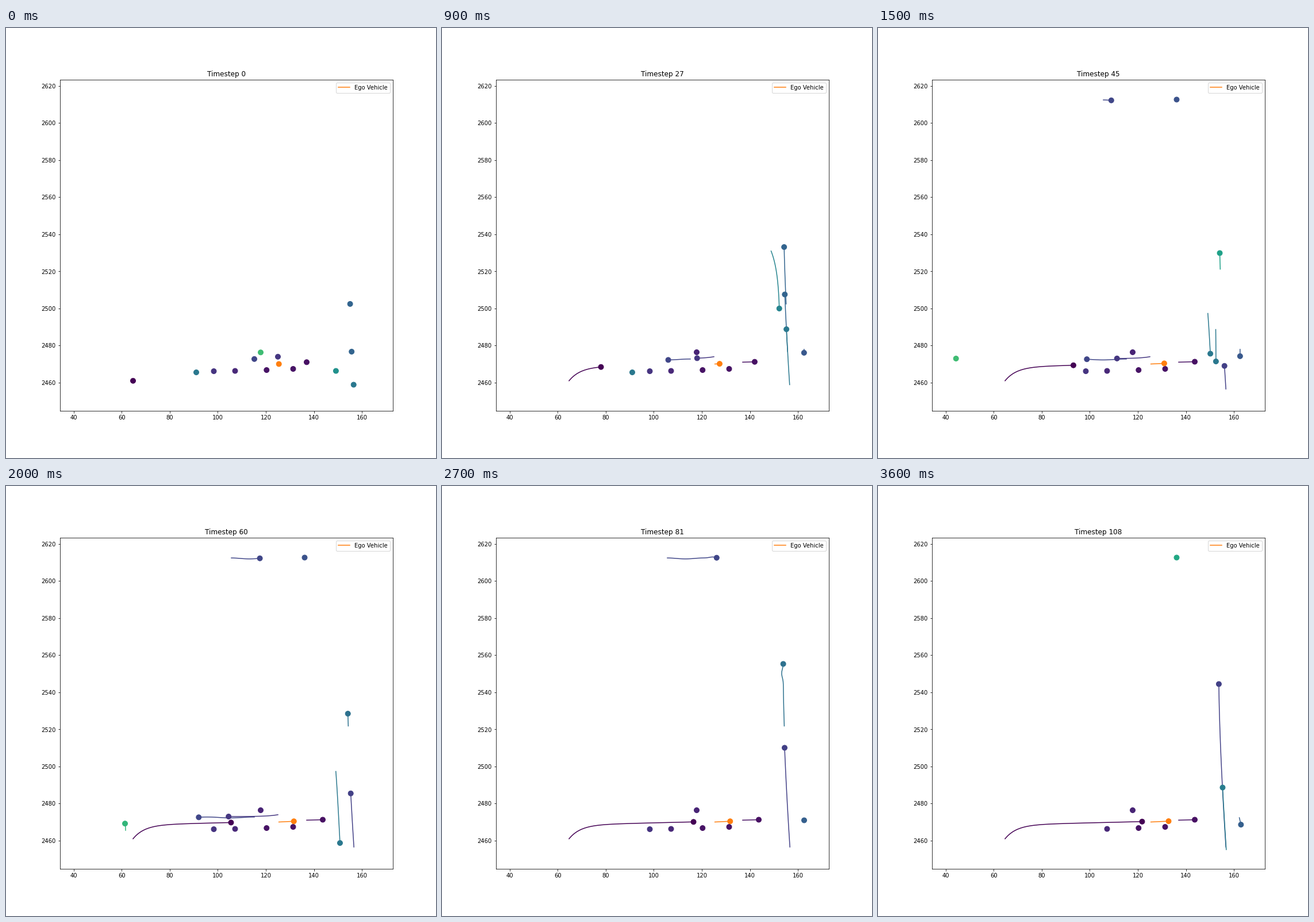
A matplotlib script for the animation above (3.7 s loop, 748 by 748 pixels).

```python
import numpy as np
import matplotlib.pyplot as plt
from matplotlib.animation import FuncAnimation

SIZE, DPI = 748, 72
FRAMES, STEP = 37, 3
LAST = (FRAMES - 1) * STEP
EGO = "#ff7f0e"


def to_data(px, py):
    """Stage pixels to plot units."""
    return 40 + (px - 117.5) / 4.183, 2460 + (617 - py) / 3.225


def run(t, speed, accel=0):
    return speed * t + accel * t ** 2


def logistic(t, mid, width):
    return 1 / (1 + np.exp((mid - t) / width))


def north_lane(y):
    curve = 12 * (np.maximum(y - 345, 0) / 280) ** 1.5
    return 593 + curve - 3 * np.exp(-((y - 326) / 10) ** 2)


def south_lane(y):
    return 588 - 15.5 * np.exp((388 - y) / 40)


cars = []


def add(color, first, last, path):
    """path maps steps since birth to stage pixels."""
    if not isinstance(color, str):
        color = plt.cm.viridis(color)
    t = np.arange(last - first + 1.0)
    cars.append((color, first, last, to_data(*path(t))))


def park(shade, x, y, first=0, last=LAST):
    add(shade, first, last, lambda t: (x + 0 * t, y + 0 * t))


def drive(shade, first, last, y0, speed, accel=0, dx=0, drift=0):
    """Follow the north or south lane, depending on the sign of speed."""
    lane = north_lane if speed < 0 else south_lane

    def path(t):
        y = y0 + run(t, speed, accel)
        return lane(y) + dx + drift * (y - y0), y
    add(shade, first, last, path)


def merging(t):
    dx = 268 * (logistic(t, 43, 18) - logistic(0, 43, 18))
    return 221 + dx, 589.5 - 0.024 * dx + 24.2 * np.exp(-dx / 20)


def westbound_near(t):
    dx = run(t, 1.27, 0.0057)
    return 432 - dx, 576.6 - 0.8 * np.cos(dx / 13)


def westbound_far(t):
    dx = run(t, 0.8, 0.0105)
    return 473 - dx, 575 - 3.2 * np.exp(-dx / 18)


def stopping(t):
    s = 1 - (1 - np.minimum(t / 45, 1)) ** 1.5
    return 523 + 28 * s, 581.3 - 0.8 * s


def top_street(t):
    dx = run(t, 2.85, -0.0185)
    bump = 2.6 * np.exp(-((dx - 80) / 9) ** 2)
    return 392 + dx, 126 - 0.8 * np.cos(dx / 10) - bump


def turning(t):
    s = t / 15
    return 208 - 24 * s ** 2, 579 + 20 * (1 - s) ** 4


def ego(t):
    dx = 26.6 * logistic(t, 32, 6.5) + 5 * logistic(t, 98, 5)
    return 474.5 + dx, 584.5 - 0.047 * dx


# parked or waiting
park(0.69, 443, 564.3, last=8)
park(0.10, 443, 564, first=21)
park(0.40, 331, 599, last=38)
park(0.15, 361.5, 597, last=95)
park(0.11, 398.5, 596.5)
park(0.05, 453.3, 595)
park(0.05, 499.5, 593)
park(0.69, 135.7, 575, 42, 48)
park(0.25, 519.5, 124.5, 39, 72)
park(0.60, 519.5, 124.5, 99)
park(0.30, 630, 581.5, 77, 84)

# southbound
drive(0.50, 0, 6, 596.5, 4.1, dx=-14, drift=0.1)
drive(0.45, 8, 14, 595.7, 4, dx=-14.2, drift=0.13)
drive(0.45, 3, 31, 388, 3.54, 0.026)
drive(0.40, 29, 63, 496.5, 4.76, -0.024, dx=-13.2, drift=0.05)
drive(0.40, 32, 54, 524.5, 4.27)
drive(0.27, 9, 54, 559, 0.33, dx=42)
drive(0.30, 90, LAST, 577, 0.67, dx=40.7, drift=0.23)

# northbound
drive(0.32, 0, 36, 480, -3.59, -0.0028, dx=1.6)
drive(0.32, 0, 38, 563, -3.28, -0.015)
drive(0.40, 0, 38, 620.5, -3.32, -0.0094)
drive(0.58, 2, 19, 303, -4, dx=-4)
drive(0.57, 38, 51, 419.5, -4, dx=0.7)
drive(0.37, 54, 88, 417.5, -3.46, -0.02, dx=0.8)
drive(0.19, 33, LAST, 628, -3.27, -0.0068)
drive(0.42, 84, LAST, 632.5, -4.2, -0.0125, dx=0.3)

# cross streets
add(0.21, 0, 66, westbound_near)
add(0.16, 0, 66, westbound_far)
add(0.04, 0, LAST, stopping)
add(0.66, 57, 72, turning)
add(0.21, 40, 89, top_street)
add(0.00, 0, LAST, merging)
add(EGO, 0, LAST, ego)

fig, ax = plt.subplots(figsize=(SIZE / DPI, SIZE / DPI), dpi=DPI)
left, top = to_data(0.125 * SIZE, 0.12 * SIZE)
right, bottom = to_data(0.9 * SIZE, 0.89 * SIZE)
ax.set(xlim=(left, right), ylim=(bottom, top))
ax.ticklabel_format(useOffset=False)
title = ax.set_title("Timestep 0")
ax.plot([], [], color=EGO, label="Ego Vehicle")
ax.legend(loc="upper right")

trails = [ax.plot([], [], color=color)[0] for color, *_ in cars]
dots = ax.scatter([], [], s=80, zorder=3)


def update(frame):
    step = frame * STEP
    title.set_text(f"Timestep {step}")
    heads, colors = [], []
    for trail, (color, first, last, (x, y)) in zip(trails, cars):
        n = step - first + 1 if first <= step <= last else 0
        trail.set_data(x[:n], y[:n])
        if n:
            heads.append((x[n - 1], y[n - 1]))
            colors.append(color)
    dots.set_offsets(heads)
    dots.set_color(colors)
    return [title, dots, *trails]


anim = FuncAnimation(fig, update, frames=FRAMES, interval=100, repeat=True)
plt.show()
```
